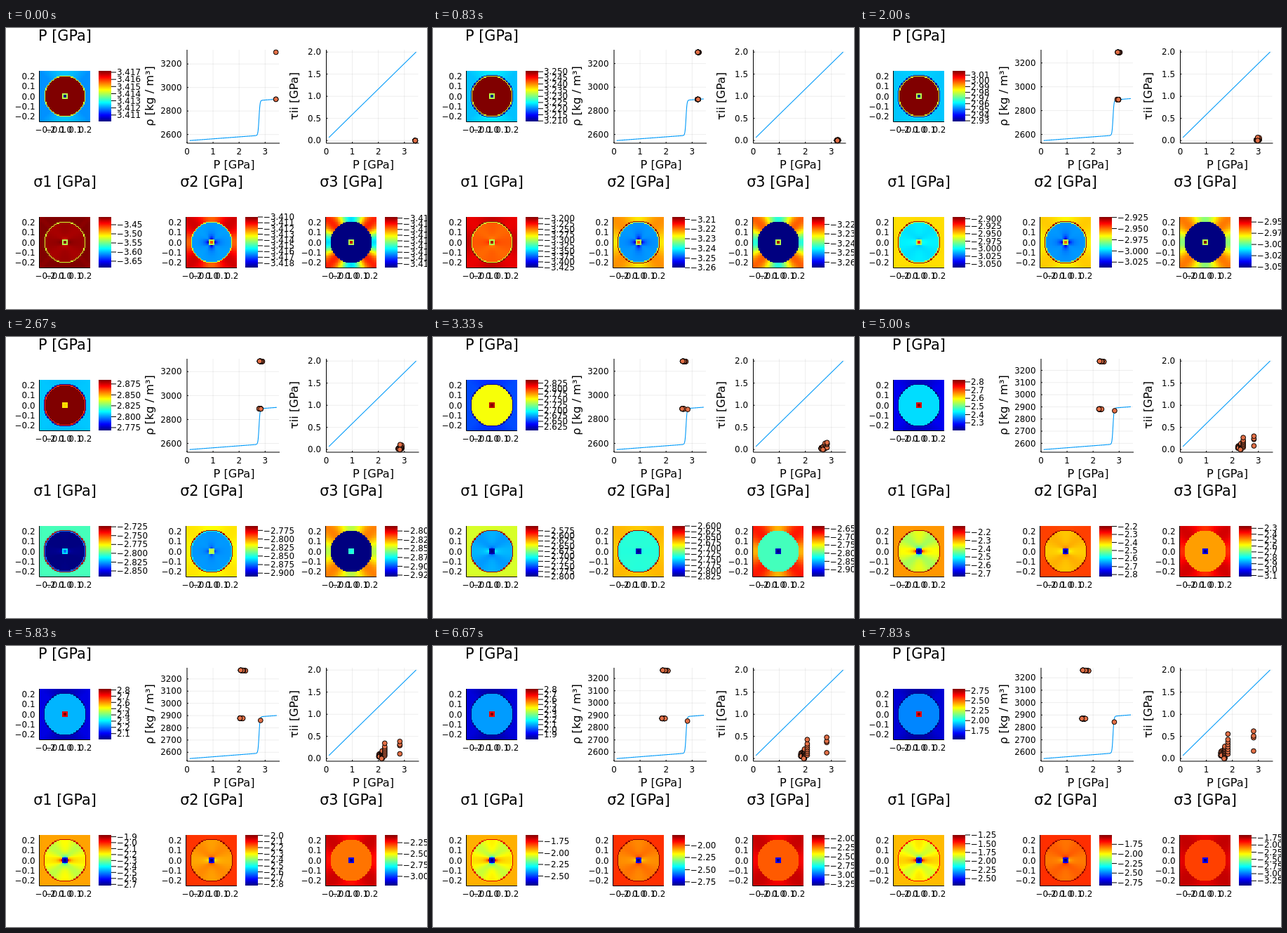
Recreate the animation shown at these times as an HTML page with a canvas. Size 600 by 400 pixels, loop 8000 ms.

```html
<!DOCTYPE html>
<html>
<head>
<meta charset="utf-8">
<style>
html, body { margin: 0; width: 100%; height: 100%; overflow: hidden; background: #fff; }
#stage { position: absolute; left: 0; top: 0; width: 600px; height: 400px; overflow: hidden; }
canvas { position: absolute; width: 72px; height: 72px; image-rendering: pixelated; }
svg { position: absolute; left: 0; top: 0; }
text { font-family: "DejaVu Sans", sans-serif; font-size: 11.9px; fill: #000; }
.title { font-size: 20.8px; }
.label { font-size: 16.2px; }
.axis { stroke: #000; stroke-width: 1; fill: none; }
.grid { stroke: #000; stroke-opacity: .07; fill: none; }
.curve { stroke: #009af9; stroke-width: 1.1; fill: none; }
.dot { fill: #e26f46; stroke: #000; stroke-width: 1; }
</style>
</head>
<body>
<div id="stage">
<svg id="svg" width="600" height="400" viewBox="0 0 600 400">
<defs><linearGradient id="jet" x1="0" y1="1" x2="0" y2="0"></linearGradient></defs>
<g id="fixed"></g>
<g id="live"></g>
</svg>
</div>
<script>
const PERIOD = 8000, STEPS = 48, LAST = STEPS - 1;
const N = 51, SIZE = 72, RADIUS = 29.2;

const clamp = (v, a = 0, b = 1) => Math.min(b, Math.max(a, v));
const mix = (a, b, k) => a + (b - a) * k;
// Value that unloads with the step: start, rate, slight slowing
const ramp = (a, rate, slow = 0) => s => a + rate * s - slow * s * s;

// Pressures and stresses in GPa. The core unloads until it meets the level it holds.
// axial, tall and lobe are angular changes in units of the colour range.
const panels = [
  { x: 48, y: 61, title: 'P [GPa]',
    out: ramp(3.412, -.0379), inside: ramp(3.4172, -.0333), ring: ramp(3.4101, -.0401),
    core: s => Math.max(3.4101 - .0401 * s, 2.87 - .0015 * s),
    tall: s => .05 * Math.cos(Math.min(s, 28) / 9) },
  { x: 48, y: 269, title: 'σ1 [GPa]',
    out: ramp(-3.4105, .0388, .00005), inside: ramp(-3.4163, .0344), ring: ramp(-3.4075, .0428),
    core: s => Math.min(-3.4095 + .0411 * s, -2.7 - .1 * ((LAST - s) / 27) ** 2),
    peak: ramp(-3.685, .0518),
    axial: s => .2 * Math.exp(-s / 3),
    lobe: s => .06 + .24 * clamp((s - 18) / 12) },
  { x: 257, y: 269, title: 'σ2 [GPa]',
    out: ramp(-3.4107, .0381, .00005), inside: ramp(-3.4163, .0342), ring: ramp(-3.41, .0405),
    core: s => Math.min(-3.4118 + .0385 * s, -2.825),
    well: ramp(-3.4188, .0318),
    axial: s => -.14 * Math.exp(-s / 10),
    lobe: s => -.1 * clamp((s - 18) / 12) },
  { x: 456, y: 269, title: 'σ3 [GPa]',
    out: ramp(-3.4112, .0378, .00006), inside: ramp(-3.4187, .0306),
    core: s => Math.min(-3.4104 + .0393 * s, -2.593 - .0175 * s),
    peak: ramp(-3.4098, .0398, .00005),
    axial: s => -.5 * Math.exp(-s / 17) }
];

const stage = document.getElementById('stage');
const svg = document.getElementById('svg');

function range(p, s) {
  const parts = [p.out, p.inside, p.core, p.ring, p.peak].filter(Boolean).map(f => f(s));
  const lo = Math.min(...parts, p.well ? p.well(s) : Infinity);
  return [lo, Math.max(...parts)];
}

function jet(v) {
  v = clamp(v);
  return [3, 2, 1].map(c => Math.round(255 * clamp(1.5 - Math.abs(4 * v - c))));
}

const num = v => String(v).replace('-', '−');
const line = (x1, y1, x2, y2, cls) => `<path class="${cls}" d="M${x1} ${y1}L${x2} ${y2}"/>`;
const text = (x, y, str, anchor = 'middle', cls = '') =>
  `<text x="${x}" y="${y}" text-anchor="${anchor}" class="${cls}">${str}</text>`;
const dot = (x, y) => `<circle class="dot" cx="${x.toFixed(2)}" cy="${y.toFixed(2)}" r="3.4"/>`;

function random(seed) {
  return () => (seed = (seed * 16807) % 2147483647) / 2147483647;
}

// Heatmaps
function paint(p, s) {
  const [lo, hi] = range(p, s);
  const level = f => (f(s) - lo) / (hi - lo);
  const extra = f => f ? f(s) : 0;
  const out = level(p.out), inside = level(p.inside), core = level(p.core);
  const ring = p.ring && mix(out, level(p.ring), .92);
  const axial = extra(p.axial), tall = extra(p.tall), lobe = extra(p.lobe);
  const early = clamp((18 - s) / 5);
  const rim = mix(mix(core, inside, .15), .55, early);
  const img = p.ctx.createImageData(N, N);

  for (let j = 0; j < N; j++) for (let i = 0; i < N; i++) {
    const x = (i - (N - 1) / 2) * SIZE / N, y = (j - (N - 1) / 2) * SIZE / N;
    const r = Math.hypot(x, y), a = Math.atan2(y, x);
    const c2 = Math.cos(2 * a), c4 = Math.cos(4 * a);
    const near = Math.min(1, 20 / (r * r));
    let z;
    if (r < 2.3) z = core;
    else if (r < 4) z = rim;
    else if (r < RADIUS) {
      z = inside + lobe * (c2 * near + .12 * c4);
      if (p.well) z = mix(z, 0, early * near * (.6 + .4 * c4));
      if (p.ring && r > RADIUS - 1.1) z = mix(z, .58, early);
    } else {
      z = out + axial * (.5 + .5 * c4) + tall * Math.max(0, -c2);
      if (p.ring && r < RADIUS + 1.5) z = mix(z, ring, clamp(s / 4));
    }
    img.data.set([...jet(z), 255], (j * N + i) * 4);
  }
  p.ctx.putImageData(img, 0, 0);
}

// Smallest round step that leaves about ten ticks
function tickStep(span) {
  for (let e = -4; e < 1; e++) for (const m of [1, 2.5, 5]) {
    if (span / (m * 10 ** e) < 10.1) return [m * 10 ** e, m === 2.5 ? 1 - e : -e];
  }
}

function barTicks(p, s) {
  const [lo, hi] = range(p, s), [step, digits] = tickStep(hi - lo);
  let out = '';
  for (let n = Math.ceil(lo / step - .02); n * step <= hi + step * .02; n++) {
    const y = p.y + SIZE * (hi - n * step) / (hi - lo);
    out += line(p.x + 102, y, p.x + 109, y, 'axis') +
      text(p.x + 110, y + 4.2, num((n * step).toFixed(digits)), 'start');
  }
  return out;
}

function mapFrame(p) {
  const cx = p.x + 36.5, cy = p.y + 36.5;
  let out = text(cx - .5, p.y - 43, p.title, 'middle', 'title') +
    `<rect x="${p.x + 84}" y="${p.y}" width="18" height="72" fill="url(#jet)"/>` +
    `<path class="axis" d="M${p.x - .5} ${p.y}v72.5h72.5"/>`;
  for (let k = -2; k <= 2; k++) {
    const str = num((k / 10).toFixed(1));
    out += text(cx + k * 14.2, p.y + 88, str) + text(p.x - 6.5, cy - k * 14.2 + 4, str, 'end');
  }
  return out;
}

// Line plots
const LEFT = 258, LEFT2 = 456.5, TOP = 31, BOTTOM = 164, UNIT = 37.1;
const px = (x0, p) => x0 + p * UNIT;
const tauY = t => 160.2 - 63 * t;
const rhoOf = p => 2547 + 16.5 * p + 297 / (1 + Math.exp((2.765 - p) / .019));

function plotFrame(x0, label, gap) {
  let out = '';
  for (let k = 0; k < 4; k++) {
    const x = px(x0, k);
    out += line(x, TOP, x, BOTTOM, 'grid') + line(x, BOTTOM, x, BOTTOM - 2, 'axis') +
      text(x, 180, k);
  }
  return out + `<path class="axis" d="M${x0} ${TOP}V${BOTTOM}H${x0 + 132}"/>` +
    text(x0 + 67, 199.7, 'P [GPa]', 'middle', 'label') +
    `<text class="label" text-anchor="middle" transform="translate(${x0 - gap} 97) rotate(-90)">${label}</text>`;
}

const yTick = (x0, y, str) => line(x0, y, x0 + 131, y, 'grid') +
  line(x0, y, x0 + 2, y, 'axis') + text(x0 - 7.5, y + 4.2, str, 'end');

function plots(s) {
  const t = s / LAST, spread = t ** .7, load = t ** 1.6;
  const p0 = 3.415 - 1.735 * t;
  const held = Math.max(p0, 2.84 - .025 * load);
  const top = 3300 - 39 * t, low = 2900 - 17 * (3.415 - p0);
  const rhoY = r => 160 - (r - 2550) * 125.5 / (top - 2550);
  const rnd = random(77);
  const between = (a, b) => mix(a, b, rnd());
  let out = '';

  for (let r = 2600; r <= 3200; r += s < 25 ? 200 : 100) out += yTick(LEFT, rhoY(r), r);
  let d = '';
  for (let p = .1; p <= 3.45; p += .01) {
    d += `${d ? 'L' : 'M'}${px(LEFT, p).toFixed(2)} ${rhoY(rhoOf(p)).toFixed(2)}`;
  }
  out += `<path class="curve" d="${d}"/>`;

  const rhoDot = (p, r) => { out += dot(px(LEFT, p), rhoY(r)); };
  const tauDot = (p, v) => { out += dot(px(LEFT2, p), tauY(v * load)); };

  // The cluster opens up as the load grows
  const count = s ? 20 : 1;
  for (let k = 0; k < count; k++) {
    const u = rnd() ** 2;
    rhoDot(p0 + spread * mix(-.08, .15, u), top - 5 * spread * u);
    rhoDot(p0 + spread * between(-.11, .06), low + 2 * spread * between(-1, 1));
  }
  rhoDot(held, low - 27 * clamp((s - 14) / 33));

  for (let k = 0; k < 2 * count; k++) tauDot(p0 + spread * between(-.13, .04), between(.06, .18));
  for (let k = 0; k < 12; k++) tauDot(p0 + spread * .03, .025 * k);
  for (let k = 0; k < 8; k++) tauDot(p0 + spread * .15, .1 + .055 * k + (k === 7 ? .07 : 0));
  for (const v of [.17, .47, .51, .62]) tauDot(held, v);
  tauDot(p0, 0);
  return out;
}

// Static parts
document.getElementById('jet').innerHTML = Array.from({ length: 9 }, (_, i) =>
  `<stop offset="${i / 8}" stop-color="rgb(${jet(i / 8)})"/>`).join('');

for (const p of panels) {
  const c = document.createElement('canvas');
  c.width = c.height = N;
  c.style.left = p.x + 'px';
  c.style.top = p.y + 'px';
  stage.insertBefore(c, svg);
  p.ctx = c.getContext('2d');
}

let fixed = panels.map(mapFrame).join('') +
  plotFrame(LEFT, 'ρ [kg / m³]', 48.5) + plotFrame(LEFT2, 'τii [GPa]', 41);
for (let k = 0; k < 5; k++) fixed += yTick(LEFT2, tauY(k / 2), (k / 2).toFixed(1));
fixed += line(px(LEFT2, .1), tauY(.07), px(LEFT2, 3.45), tauY(2), 'curve');
document.getElementById('fixed').innerHTML = fixed;

const live = document.getElementById('live');
let shown = -1;

function render(ms) {
  const s = Math.min(LAST, Math.floor((ms % PERIOD + 5) * STEPS / PERIOD));
  if (s === shown) return;
  shown = s;
  panels.forEach(p => paint(p, s));
  live.innerHTML = panels.map(p => barTicks(p, s)).join('') + plots(s);
}

const start = performance.now();
function tick() {
  render(performance.now() - start);
  requestAnimationFrame(tick);
}
render(0);
requestAnimationFrame(tick);
</script>
</body>
</html>
```
